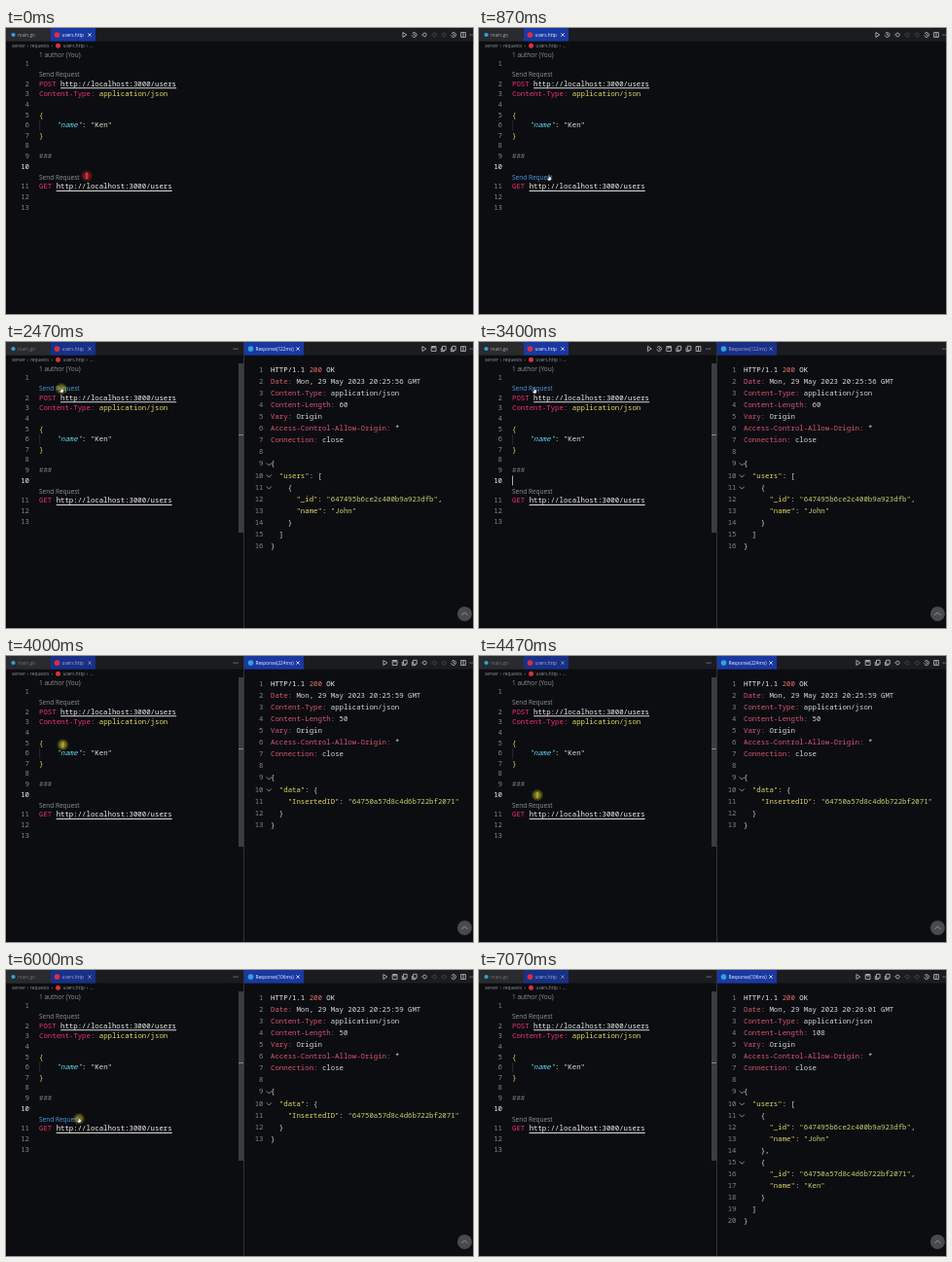
Recreate the animation shown at these times as an HTML page with a canvas. Size 480x294 px, loop 7670 ms.

```html
<!DOCTYPE html>
<html lang="en">
<head>
<meta charset="utf-8">
<title>REST client</title>
<style>
html, body { margin: 0; width: 100%; height: 100%; overflow: hidden; background: #0b0d11; }
canvas { display: block; width: 480px; height: 294px; }
</style>
</head>
<body>
<canvas id="stage" width="480" height="294"></canvas>
<script>
const ctx = document.getElementById('stage').getContext('2d');
const LOOP = 7670;
const MONO = '"Noto Sans Mono", "DejaVu Sans Mono", monospace';
const SANS = '"Open Sans", "Noto Sans", sans-serif';
const CW = 4.41;
const CODE_SIZE = CW / 0.6;
const C = {
  bg: '#0b0d11', bar: '#1b1c20', tab: '#1a38a2', tabDim: '#183088',
  white: '#f2f2ee', soft: '#d8d9d6', gray: '#929496', num: '#858781',
  pink: '#f0316b', head: '#dd566f', yellow: '#e6db63', cyan: '#66d9ef',
  key: '#e6d768', str: '#c8d472', link: '#4f9fe8', red: '#d8303f', sky: '#2fa4dc'
};

const LEFT = { x: 34, numX: 24 };
const RIGHT = { x: 272, numX: 264.5 };
const leftY = n => 36.9 + (n - 1) * 10.62 + (n > 1 ? 10 : 0) + (n > 10 ? 10.1 : 0);
const rightY = n => 28.8 + (n - 1) * 12.07;

// [time, x, y] of the pointer
const PATH = [
  [0, 83, 152], [130, 83, 152], [520, 72, 153], [1470, 72, 153], [1670, 79.5, 135.5],
  [2130, 57, 48], [3670, 57, 49], [4380, 60, 143], [4500, 60, 143], [4950, 68, 155],
  [5200, 70, 153], [5930, 70, 153], [6000, 75, 153], [6670, 122, 162], [7070, 318, -12]
];
// [start, end] of the highlight around the pointer
const GLOWS = [[-200, 870], [1400, 2930], [3600, 5200], [5880, 7070]];

const headers = (time, length) => [
  ['Date', 'Mon, 29 May 2023 ' + time + ' GMT'],
  ['Content-Type', 'application/json'],
  ['Content-Length', length],
  ['Vary', 'Origin'],
  ['Access-Control-Allow-Origin', '*'],
  ['Connection', 'close']
];
const john = { _id: '647495b6ce2c400b9a923dfb', name: 'John' };
const ken = { _id: '64750a57d8c4d6b722bf2071', name: 'Ken' };
const RESPONSES = [
  { at: 2270, head: headers('20:25:56', 60), body: { users: [john] } },
  { at: 3930, head: headers('20:25:59', 50), body: { data: { InsertedID: ken._id } } },
  { at: 6270, head: headers('20:26:01', 108), body: { users: [john, ken] } }
];
const TITLES = [[930, 122], [3600, 224], [5930, 106]];

const last = (list, test) => list.filter(test).pop();
const within = (t, a, b) => t >= a && t < b;

function text(str, x, y, size, color) {
  ctx.font = `${size}px ${SANS}`;
  ctx.fillStyle = color;
  ctx.fillText(str, x, y + size * 0.34);
}

function mono(str, x, y, color, style = '') {
  ctx.font = `${style} 500 ${CODE_SIZE}px ${MONO}`;
  ctx.fillStyle = color;
  ctx.fillText(str, x, y + CODE_SIZE * 0.29);
}

function rect(x, y, w, h, color) {
  ctx.fillStyle = color;
  ctx.fillRect(x, y, w, h);
}

function dot(x, y, r, color) {
  ctx.fillStyle = color;
  ctx.beginPath();
  ctx.arc(x, y, r, 0, Math.PI * 2);
  ctx.fill();
}

function line(points, color, width = 0.8) {
  ctx.strokeStyle = color;
  ctx.lineWidth = width;
  ctx.beginPath();
  points.forEach(([x, y]) => ctx.lineTo(x, y));
  ctx.stroke();
}

// Parts are [string, color, style]; columns follow the monospace grid.
function code(pane, y, parts, col = 0) {
  for (const [str, color, style] of parts) {
    mono(str, pane.x + col * CW, y, color, style);
    col += str.length;
  }
}

function lineNumber(pane, n, y, color = C.num) {
  ctx.textAlign = 'right';
  mono(n, pane.numX, y, color);
  ctx.textAlign = 'left';
}

function icon(kind, x, color = '#c6c7c9') {
  const y = 7;
  ctx.strokeStyle = ctx.fillStyle = color;
  ctx.lineWidth = 0.8;
  ctx.beginPath();
  if (kind === 'play') {
    ctx.moveTo(x - 1.6, y - 2.5);
    ctx.lineTo(x + 2.3, y);
    ctx.lineTo(x - 1.6, y + 2.5);
    ctx.closePath();
  } else if (kind === 'save') {
    ctx.rect(x - 2.4, y - 2.4, 4.8, 4.8);
    ctx.rect(x - 1.2, y - 2.4, 2.4, 1.5);
  } else if (kind === 'copy') {
    ctx.rect(x - 1.2, y - 2.7, 3.6, 4);
    ctx.moveTo(x - 2.4, y - 1.2);
    ctx.lineTo(x - 2.4, y + 2.6);
    ctx.lineTo(x + 1.2, y + 2.6);
  } else if (kind === 'split') {
    ctx.rect(x - 2.4, y - 2.4, 4.8, 4.8);
    ctx.moveTo(x, y - 2.4);
    ctx.lineTo(x, y + 2.4);
  } else if (kind === 'dots') {
    for (const d of [-1.9, 0, 1.9]) ctx.fillRect(x + d - 0.4, y - 0.4, 0.9, 0.9);
  } else if (kind === 'history') {
    ctx.arc(x, y, 2.4, -2.6, 3);
    ctx.moveTo(x, y - 1.4);
    ctx.lineTo(x, y + 0.2);
    ctx.lineTo(x + 1.2, y + 0.8);
  } else {
    ctx.arc(x + 0.3, y, 1.9, -2.8, 2.6);
    ctx.moveTo(x - 2.8, y);
    ctx.lineTo(x - 0.4, y);
  }
  ctx.stroke();
}

const icons = (kinds, x, step = 10.1) => kinds.forEach((k, i) => icon(k, x + i * step));

function gitIcons() {
  icon('ring', 430);
  icon('ring', 440, '#4b4c50');
  icon('ring', 450, '#4b4c50');
  icon('history', 460);
}

function tab(x, w, label, color, active) {
  rect(x, 0, w, 13.6, active ? C.tab : C.tabDim);
  dot(x + 6.5, 7, 2.8, color);
  text(label, x + 11.5, 7, 4.75, active ? '#f4f5fa' : '#a4adcb');
  const cx = x + w - 6, ink = active ? '#e8eaf2' : '#8d97bb';
  line([[cx - 1.7, 5.3], [cx + 1.7, 8.7]], ink);
  line([[cx + 1.7, 5.3], [cx - 1.7, 8.7]], ink);
}

function sendRequest(y, hover) {
  text('Send Request', 34, y, 6.5, hover ? C.link : C.gray);
}

function request(n, method, url) {
  const y = leftY(n), col = method.length + 1;
  code(LEFT, y, [[method + ' ', C.pink], [url, C.white]]);
  rect(LEFT.x + col * CW, y + 3.8, url.length * CW, 0.9, C.white);
}

function editor(t, mouse, focus) {
  rect(0, 0, 480, 13.6, C.bar);
  rect(0, 0, 46, 13.6, '#292b2f');
  dot(7.5, 7, 2.1, C.sky);
  text('main.go', 12, 7, 4.75, focus ? '#a4a6a9' : '#6f7276');
  tab(46, 46, 'users.http', C.red, focus);

  text('server', 6, 18.2, 4.75, C.gray);
  text('›', 21.5, 18, 5, C.gray);
  text('requests', 25, 18.2, 4.75, C.gray);
  text('›', 46.5, 18, 5, C.gray);
  dot(53.5, 18.2, 2.5, C.red);
  text('users.http', 58.5, 18.2, 4.75, C.gray);
  text('›', 82.5, 18, 5, C.gray);
  text('...', 86, 18.2, 4.75, C.gray);

  text('1 author (You)', 34, 27.6, 6.5, C.gray);
  for (let n = 1; n <= 13; n++) lineNumber(LEFT, n, leftY(n), n === 10 ? C.white : C.num);
  const over = y => hovering(mouse, y);
  sendRequest(47.4, over(47.5));
  sendRequest(153.4, over(153.5));

  request(2, 'POST', 'http://localhost:3000/users');
  code(LEFT, leftY(3), [['Content-Type:', C.pink], [' application/json', C.yellow]]);
  code(LEFT, leftY(5), [['{', C.yellow]]);
  rect(34.5, leftY(6) - 5, 0.6, 10.5, '#3a3c40');
  code(LEFT, leftY(6), [['"name"', C.cyan, 'italic'], [': ', C.white], ['"Ken"', '#e4e4d2']], 4);
  code(LEFT, leftY(7), [['}', C.yellow]]);
  code(LEFT, leftY(9), [['###', '#77756a']]);
  request(11, 'GET', 'http://localhost:3000/users');

  const caret = within(t, 300, 800) || within(t, 3400, 3600) || within(t, 5530, 5930);
  if (caret) rect(34, leftY(10) - 5, 0.8, 10, '#d8d8d4');
}

// Flattens a value into rows of { depth, parts, fold }.
function jsonRows(value, depth = 0, key = null, comma = '') {
  const lead = key === null ? [] : [[`"${key}"`, C.key], [': ', C.soft]];
  if (typeof value === 'string') {
    return [{ depth, parts: [...lead, [`"${value}"`, C.str], [comma, C.soft]] }];
  }
  const list = Array.isArray(value);
  const items = Object.entries(value);
  const inner = items.flatMap(([k, v], i) =>
    jsonRows(v, depth + 1, list ? null : k, i < items.length - 1 ? ',' : ''));
  return [
    { depth, parts: [...lead, [list ? '[' : '{', C.soft]], fold: true },
    ...inner,
    { depth, parts: [[(list ? ']' : '}') + comma, C.soft]] }
  ];
}

for (const r of RESPONSES) {
  r.rows = [
    { depth: 0, parts: [['HTTP/1.1 ', C.white], ['200', '#e87068'], [' OK', C.white]] },
    ...r.head.map(([k, v]) => ({ depth: 0, parts: [[k + ':', C.head], [' ' + v, C.soft]] })),
    { depth: 0, parts: [] },
    ...jsonRows(r.body)
  ];
}

function responsePane(t, focus) {
  rect(239, 22, 5, 174, '#3b3d40');
  rect(239, 95, 5, 1, '#8c8a70');
  rect(244, 0, 1, 294, '#303338');
  const [, ms] = last(TITLES, ([at]) => t >= at);
  tab(245, 61, `Response(${ms}ms)`, C.sky, focus);

  const shown = last(RESPONSES, r => t >= r.at);
  if (!shown) return;
  shown.rows.forEach(({ depth, parts, fold }, i) => {
    const y = rightY(i + 1);
    lineNumber(RIGHT, i + 1, y);
    code(RIGHT, y, parts, depth * 2);
    if (fold) line([[267.8, y - 1], [270.3, y + 1.6], [272.8, y - 1]], '#a9abad');
  });
  dot(471.4, 279.4, 7.5, '#484a4e');
  line([[468.4, 280.9], [471.4, 277.9], [474.4, 280.9]], '#9c9ea1', 0.9);
}

function toolbar(t, split, leftFocus) {
  icon('dots', 479);
  if (!split) {
    icons(['play', 'history'], 409.5);
    gitIcons();
    icon('split', 470);
  } else if (leftFocus) {
    icons(['play', 'history', 'save', 'copy', 'copy', 'split', 'dots'], 175);
  } else {
    icon('dots', 236);
    icon('split', 470);
    const compact = within(t, 2130, 3400);
    icons(['play', 'save', 'copy', 'copy'], compact ? 429.5 : 389.5);
    if (!compact) gitIcons();
  }
}

function pointerAt(t) {
  const i = PATH.findIndex(p => p[0] > t);
  if (i < 0) return { x: -50, y: -50 };
  const [t0, x0, y0] = PATH[i - 1], [t1, x1, y1] = PATH[i];
  const k = (t - t0) / (t1 - t0), e = k * k * (3 - 2 * k);
  return { x: x0 + (x1 - x0) * e, y: y0 + (y1 - y0) * e };
}

function hovering({ x, y }, linkY) {
  return x > 33 && x < 77 && Math.abs(y - linkY) < 4.5;
}

function hand(x, y) {
  ctx.fillStyle = '#f4f4f0';
  ctx.strokeStyle = '#15161a';
  ctx.lineWidth = 0.5;
  ctx.beginPath();
  [[-0.6, -2.2], [0.5, -2.2], [0.6, 0], [2.4, 0.5], [2.2, 2.9], [1.4, 4.1],
   [-0.8, 4.1], [-2.4, 1.5], [-0.6, 1.5]].forEach(([dx, dy]) => ctx.lineTo(x + dx, y + dy));
  ctx.closePath();
  ctx.fill();
  ctx.stroke();
}

function beam(x, y) {
  const ink = 'rgba(225,222,190,0.6)';
  line([[x, y - 2.6], [x, y + 2.6]], ink, 0.7);
  for (const d of [-2.6, 2.6]) line([[x - 1.1, y + d], [x + 1.1, y + d]], ink, 0.6);
}

function pointer(t, mouse) {
  const { x, y } = mouse;
  const span = GLOWS.find(([a, b]) => within(t, a, b));
  if (span) {
    const a = Math.min(1, (t - span[0]) / 130, (span[1] - t) / 250);
    const rgb = t < 260 ? '225,25,35' : '205,190,20';
    const glow = ctx.createRadialGradient(x, y, 0, x, y, 6.5);
    glow.addColorStop(0, `rgba(${rgb},${0.85 * a})`);
    glow.addColorStop(0.5, `rgba(${rgb},${0.5 * a})`);
    glow.addColorStop(1, `rgba(${rgb},0)`);
    dot(x, y, 6.5, glow);
  }
  const onLink = hovering(mouse, 47.5) || hovering(mouse, 153.5);
  (onLink ? hand : beam)(x, y);
}

function draw(now) {
  const t = now % LOOP;
  const split = t >= 930;
  const leftFocus = !split || within(t, 3400, 3600) || within(t, 5530, 5930);
  const mouse = pointerAt(t);
  rect(0, 0, 480, 294, C.bg);
  editor(t, mouse, leftFocus);
  if (split) responsePane(t, !leftFocus);
  toolbar(t, split, leftFocus);
  pointer(t, mouse);
}

const start = performance.now();
function tick() {
  draw(performance.now() - start);
  requestAnimationFrame(tick);
}
tick();
</script>
</body>
</html>
```
